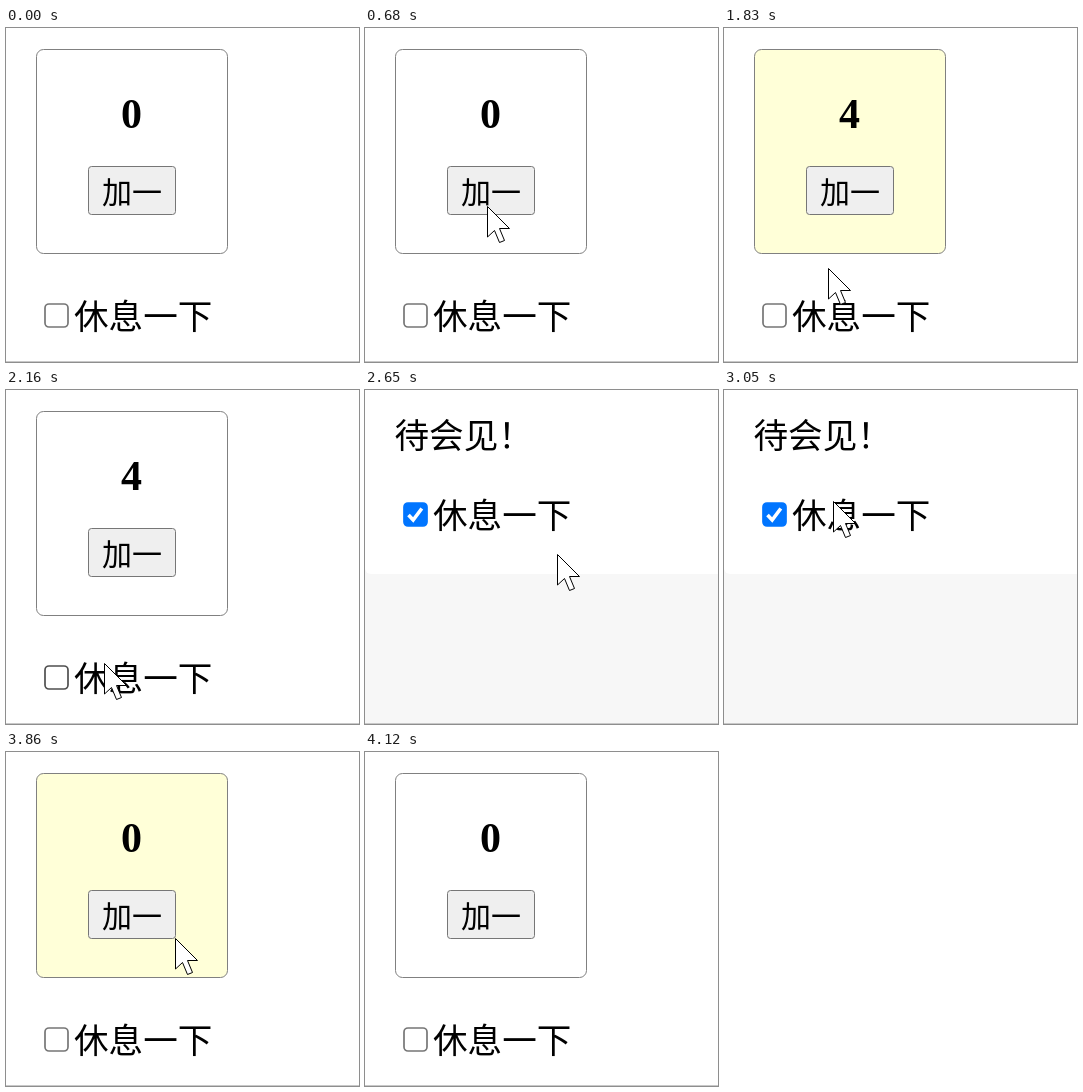
Recreate the animation shown at these times as an HTML page. Size 353 by 334 pixels, loop 4650 ms.

```html
<!DOCTYPE html>
<html lang="zh-CN">
<head>
<meta charset="utf-8">
<title>计数器</title>
<style>
  html, body { margin: 0; width: 100%; height: 100%; overflow: hidden; background: #fff; }
  svg { display: block; width: 100%; height: 100%; }
  text { font: 350 34.6px "Noto Sans CJK SC", "Noto Sans CJK", sans-serif; fill: #000; }
  #count { font: bold 42px "Liberation Serif", serif; text-anchor: middle; }
  #label { font-size: 30px; text-anchor: middle; }
</style>
</head>
<body>
<svg viewBox="0 0 353 334">
  <rect width="353" height="334" fill="#fff"/>
  <g id="bye">
    <rect y="170" width="353" height="164" fill="#f7f7f7"/>
    <rect y="-20" width="380" height="204" rx="6" fill="#fff"/>
    <text x="29.5" y="58">待会见！</text>
  </g>
  <g id="counter">
    <rect id="card" x="30.5" y="21.5" width="191" height="204" rx="7" stroke="#808080"/>
    <text id="count" x="125.5" y="100"></text>
    <rect id="button" x="82.5" y="138.5" width="87" height="48" rx="3"/>
    <text id="label" x="126" y="174.5">加一</text>
  </g>
  <g id="row">
    <rect id="box" x="39" y="276" width="23" height="23" rx="4" stroke-width="1.7"/>
    <path id="tick" d="M43.5 288l4.7 5 8.6-11.5" fill="none" stroke="#fff" stroke-width="3.6"/>
    <text x="68" y="300.5">休息一下</text>
  </g>
  <path d="M0 333.5H353" stroke="#c8c8c8"/>
  <circle id="press" r="20" fill="#fffc00" fill-opacity=".55"/>
  <path id="cursor" d="M.5 .5V31L7.5 24.5 12.5 36.5 17.5 34.5 12.5 22.5H22.5Z" fill="#fff" stroke="#000"/>
</svg>
<script>
const LOOP = 4650;
const STEP = 70;
const el = id => document.getElementById(id);
const set = (id, attrs) => {
  for (const key in attrs) el(id).setAttribute(key, attrs[key]);
};
const show = (id, on) => set(id, { visibility: on ? "visible" : "hidden" });

// Pointer glides: start, end, destination
const glides = [
  [400, 820, 121, 152],
  [1620, 2010, 98, 273],
  [2440, 2650, 192, 164],
  [2650, 2860, 133, 96],
  [2910, 3330, 85, 127],
  [3790, 4140, 350, 313]
];
const easeOut = p => 1 - (1 - p) ** 1.7;

// The screen is refreshed once per STEP while the pointer moves.
function pointer(t) {
  let x = 130, y = 318;
  for (const [start, end, toX, toY] of glides) {
    if (t < start) break;
    const moved = Math.floor((t - start) / STEP) * STEP;
    const k = t >= end ? 1 : easeOut(moved / (end - start));
    x += (toX - x) * k;
    y += (toY - y) * k;
  }
  return [Math.round(x), Math.round(y)];
}

// Mouse button down and up
const clicks = [[950, 1020], [1020, 1150], [1280, 1350], [1420, 1490]];
const toggles = [[2230, 2300], [3460, 3600]];
const [pause, resume] = toggles.map(([, up]) => up);

function draw(t) {
  const during = (from, to) => t >= from && t < to;
  const pressed = [...clicks, ...toggles].some(([down, up]) => during(down, up));
  const resting = during(pause, resume);
  const overCard = during(750, 1900) || during(3660, 3930);
  const overButton = during(750, 1760);
  const overRow = during(1970, 2520) || during(3120, 3660);

  show("bye", resting);
  show("counter", !resting);
  show("tick", resting);
  set("card", { fill: overCard ? "#ffffd8" : "#fff" });
  el("count").textContent = t < pause ? clicks.filter(([, up]) => up <= t).length : 0;
  set("button", {
    fill: !overButton ? "#efefef" : pressed ? "#f5f5f5" : "#e5e5e5",
    stroke: !overButton ? "#767676" : pressed ? "#8d8d8d" : "#4f4f4f"
  });

  const blue = overRow ? "#005cc8" : "#0075ff";
  set("row", { transform: `translate(0 ${resting ? -163 : 0})` });
  set("box", {
    fill: resting ? blue : "#fff",
    stroke: resting ? blue : overRow ? "#4f4f4f" : "#767676"
  });

  const [x, y] = pointer(t);
  show("cursor", during(400, 4120));
  show("press", pressed);
  set("cursor", { transform: `translate(${x} ${y})` });
  set("press", { cx: x, cy: y - 2 });
}

function frame() {
  draw(performance.now() % LOOP);
  requestAnimationFrame(frame);
}
frame();
</script>
</body>
</html>
```
